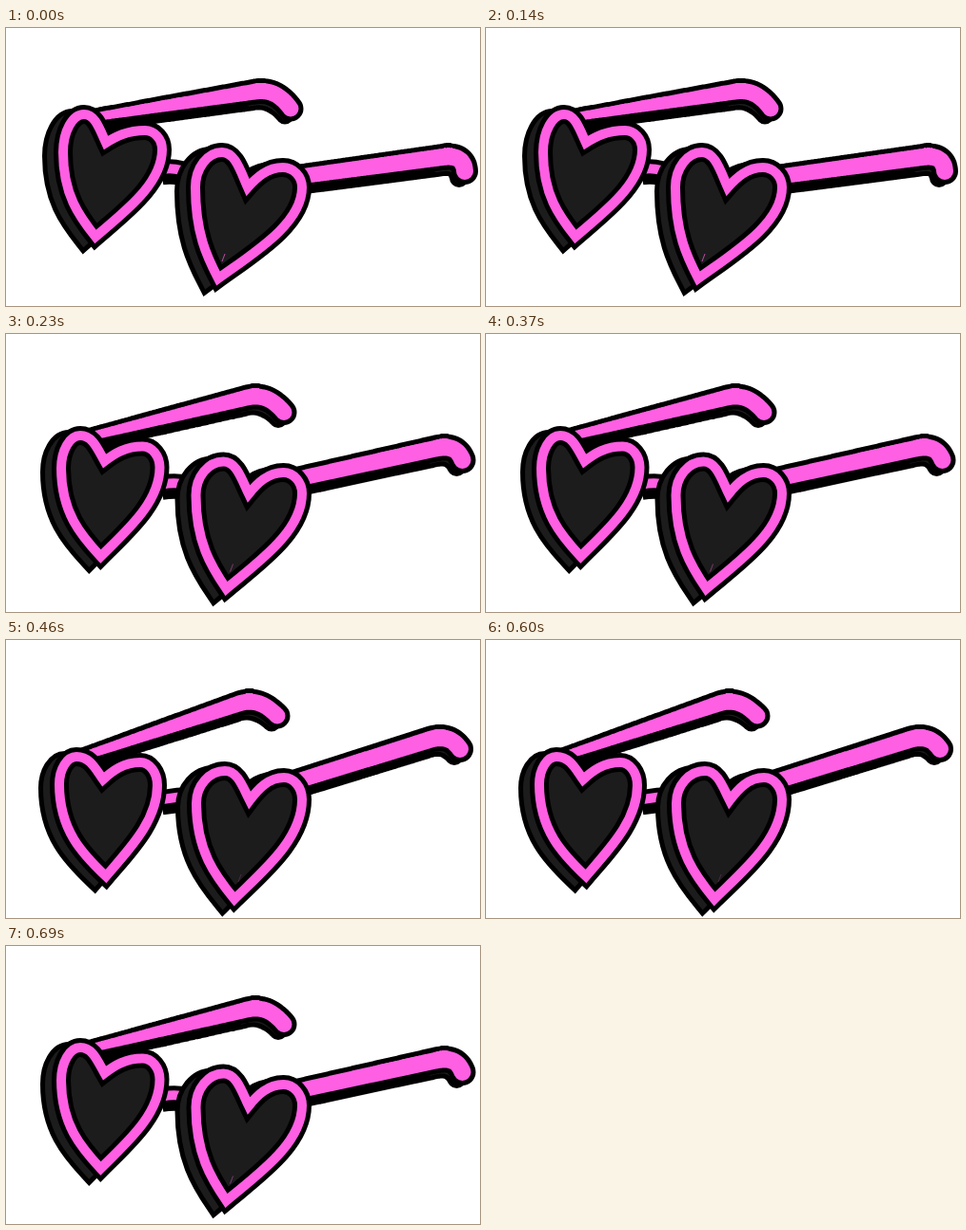
These frames come from a looping animation (498 px wide and 293 px high, 920 ms). An HTML page with a canvas:

```html
<!DOCTYPE html>
<html lang="en">
<head>
<meta charset="utf-8">
<title>Heart sunglasses</title>
<style>
  html, body { margin: 0; width: 100%; height: 100%; overflow: hidden; background: #fff; }
  canvas { display: block; }
</style>
</head>
<body>
<canvas id="stage" width="498" height="293"></canvas>
<script>
const ctx = document.getElementById('stage').getContext('2d');
const PINK = '#ff5fe3', DARK = '#1c1c1c', INK = '#000';
const STEP = 230;
const OUTLINE = 5;

// The two ends of the nod; every pose is a blend of them.
// Hearts: left side, left top, notch, right top, right side, tip.
// Arms: hinge, bend, end.
const up = {
  left: [60, 131, 82, 91, 105, 121, 146, 108, 164, 128, 94, 220],
  right: [199, 168, 227, 131, 254, 168, 291, 147, 311, 168, 223, 264],
  farArm: [98, 93, 262, 67, 299, 85],
  nearArm: [305, 157, 459, 136, 482, 151],
  bridge: [164, 149, 196, 155],
  glint: [0.7]
};
const down = {
  left: [56, 152, 74, 123, 102, 147, 141, 129, 159, 153, 105, 249],
  right: [200, 172, 230, 138, 256, 169, 292, 145, 311, 168, 240, 273],
  farArm: [83, 122, 245, 67, 285, 80],
  nearArm: [305, 149, 445, 105, 477, 115],
  bridge: [164, 168, 196, 165],
  glint: [0.2]
};

const mix = (a, b, t) => a + (b - a) * t;

function shifted(dx, dy, draw) {
  ctx.save();
  ctx.translate(dx, dy);
  draw();
  ctx.restore();
}

function stroke(width, color) {
  ctx.lineWidth = width;
  ctx.strokeStyle = color;
  ctx.stroke();
}

function heartPath([lx, ly, ax, ay, nx, ny, bx, by, rx, ry, px, py]) {
  const lh = py - ly, rh = py - ry;
  ctx.beginPath();
  ctx.moveTo(nx, ny);
  ctx.bezierCurveTo(mix(nx, ax, 0.3), mix(ny, ay, 0.5), mix(ax, nx, 0.5), ay, ax, ay);
  ctx.bezierCurveTo(mix(ax, lx, 0.55), ay, lx, mix(ly, ay, 0.55), lx, ly);
  ctx.bezierCurveTo(lx, ly + 0.5 * lh, mix(px, lx, 0.5), py - 0.24 * lh, px, py);
  ctx.bezierCurveTo(mix(px, rx, 0.42), py - 0.28 * rh, rx, py - 0.6 * rh, rx, ry);
  ctx.bezierCurveTo(rx, mix(ry, by, 0.55), mix(bx, rx, 0.55), by, bx, by);
  ctx.bezierCurveTo(mix(bx, nx, 0.45), by, mix(nx, bx, 0.25), mix(ny, by, 0.5), nx, ny);
  ctx.closePath();
}

// A lens with its rim: one outline stroked twice.
function glass(points) {
  const layer = color => {
    heartPath(points);
    ctx.fillStyle = DARK;
    ctx.fill();
    stroke(10 + 2 * OUTLINE, INK);
    stroke(10, color);
  };
  shifted(-12, 4, () => layer(DARK));
  layer(PINK);
}

// Dots along a straight bar (t 0..1) and its curved hook (t 1..2).
function bar([x0, y0, x1, y1, x2, y2], radius, color, from = 0) {
  const reach = 22 / Math.hypot(x1 - x0, y1 - y0);
  const cx = mix(x0, x1, 1 + reach), cy = mix(y0, y1, 1 + reach);
  const bend = (a, b, c, t) => mix(mix(a, b, t), mix(b, c, t), t);
  ctx.fillStyle = color;
  ctx.beginPath();
  for (let t = from; t <= 2; t += 1 / 128) {
    const x = t < 1 ? mix(x0, x1, t) : bend(x1, cx, x2, t - 1);
    const y = t < 1 ? mix(y0, y1, t) : bend(y1, cy, y2, t - 1);
    const r = radius(t);
    ctx.moveTo(x + r, y);
    ctx.arc(x, y, r, 0, 2 * Math.PI);
  }
  ctx.fill();
}

function arm(points, r0, r1) {
  const front = t => mix(r0, r1, Math.min(t, 1));
  const back = t => front(t) - 4 * Math.max(t - 1, 0);
  const grown = radius => t => radius(t) + OUTLINE;
  shifted(-6, 7, () => {
    bar(points, grown(back), INK);
    bar(points, back, DARK, 1);
  });
  bar(points, grown(front), INK);
  bar(points, front, PINK);
}

function bridge([x0, y0, x1, y1]) {
  ctx.beginPath();
  ctx.moveTo(x0, y0);
  ctx.quadraticCurveTo((x0 + x1) / 2, y0 - 3, x1, y1);
}

function glint([alpha], heart) {
  const [x, y] = heart.slice(-2);
  ctx.globalAlpha = alpha;
  ctx.beginPath();
  ctx.moveTo(x + 7, y - 26);
  ctx.lineTo(x + 4, y - 18);
  stroke(1, PINK);
  ctx.globalAlpha = 1;
}

function draw(tilt) {
  const part = name => up[name].map((v, i) => mix(v, down[name][i], tilt));
  ctx.fillStyle = '#fff';
  ctx.fillRect(0, 0, 498, 293);
  arm(part('farArm'), 4.5, 8.5);
  arm(part('nearArm'), 8, 9);
  shifted(0, 9, () => {
    bridge(part('bridge'));
    stroke(15, INK);
  });
  bridge(part('bridge'));
  stroke(10 + 2 * OUTLINE, INK);
  stroke(10, PINK);
  glass(part('left'));
  glass(part('right'));
  glint(part('glint'), part('right'));
}

const start = performance.now();
function tick() {
  const step = Math.floor((performance.now() - start) / STEP);
  draw((1 - Math.cos(step * Math.PI / 2)) / 2);
  requestAnimationFrame(tick);
}
tick();
</script>
</body>
</html>
```
